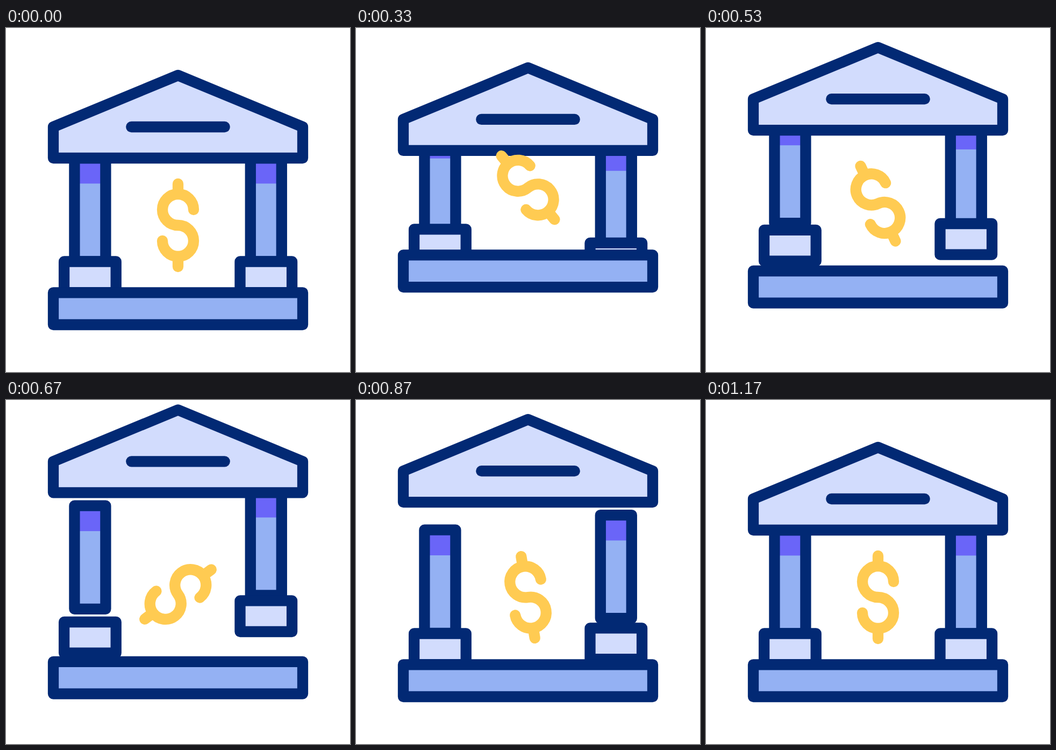
Recreate the animation shown at these times as an HTML page. Size 640 by 640 pixels, loop 1.67 s.

```html
<!DOCTYPE html>
<html lang="en">
<head>
<meta charset="utf-8">
<title>Bank</title>
<style>
  html, body { margin: 0; width: 100%; height: 100%; overflow: hidden; background: #fff; }
  svg { display: block; width: 100%; height: 100%; }
  .line { stroke: #022974; stroke-width: 20.3; stroke-linejoin: round; stroke-linecap: round; }
  .light { fill: #d2dcfd; }
  .mid { fill: #94b1f3; }
  .cap { fill: #6a65f8; }
  .coin { fill: none; stroke: #ffcb52; stroke-width: 20.3; stroke-linecap: round; }
</style>
</head>
<body>
<svg viewBox="0 0 640 640">
  <defs>
    <g id="pillar">
      <rect class="mid" x="127.4" y="242.1" width="58" height="192.2"/>
      <rect class="cap" x="127.4" y="242.1" width="58" height="47.3"/>
      <rect class="line" fill="none" x="127.4" y="242.1" width="58" height="192.2"/>
    </g>
    <rect id="foot" class="light line" x="108.1" y="434.5" width="96.6" height="57.7"/>
  </defs>
  <g id="pillarL"><use href="#pillar"/></g>
  <g id="pillarR"><use href="#pillar" x="327.4"/></g>
  <g id="footL"><use href="#foot"/></g>
  <g id="footR"><use href="#foot" x="327.4"/></g>
  <rect id="base" class="mid line" x="88" y="492.3" width="464" height="59.7"/>
  <g id="roof" class="line">
    <path class="light" d="M88 242V184L320 88L552 184V242Z"/>
    <path d="M233.3 184H406.7"/>
  </g>
  <path id="dollar" class="coin" d="M349 338A29 29 0 1 0 320 367A29 29 0 1 1 291 396M320 290V309M320 425V444"/>
</svg>
<script>
  const LOOP = 1670, STEP = 100 / 3, LAST = 35, LIFT = 71.6;
  const get = id => document.getElementById(id);

  // Each part rises between the first two ticks and falls between the last two.
  const lifts = {
    base: [0, 11, 11.1, 21.8],
    footL: [1.2, 13, 13, 24],
    pillarL: [2.25, 15.1, 15.5, 26.5],
    footR: [3.3, 17, 17.25, 28.7],
    pillarR: [4.3, 19.1, 19.3, 31],
    roof: [5.4, 21.6, 22.2, 33.2]
  };
  const swing = [[0, 0], [13.8, -49], [21, 59], [27, -15], [32, 0]];
  const parts = Object.keys(lifts).map(id => [get(id), lifts[id]]);
  const dollar = get('dollar');

  function ease(a, b, x) {
    const u = Math.min(1, Math.max(0, (x - a) / (b - a)));
    return u * u * (3 - 2 * u);
  }

  const rise = (k, x) => -LIFT * (ease(k[0], k[1], x) - ease(k[2], k[3], x));

  function angle(x) {
    let a = 0;
    for (let i = 1; i < swing.length; i++) {
      const [t0, v0] = swing[i - 1], [t1, v1] = swing[i];
      a += (v1 - v0) * ease(t0, t1, x);
    }
    return a;
  }

  function draw(ms) {
    const tick = Math.min(LAST, Math.floor((ms % LOOP + 3.4) / STEP));
    for (const [el, keys] of parts) {
      el.setAttribute('transform', `translate(0 ${rise(keys, tick).toFixed(2)})`);
    }
    dollar.setAttribute('transform',
      `translate(0 ${rise(lifts.base, tick).toFixed(2)}) rotate(${angle(tick).toFixed(2)} 320 367)`);
  }

  let start;
  function loop(now) {
    if (start === undefined) start = now;
    draw(Math.max(0, now - start));
    requestAnimationFrame(loop);
  }
  draw(0);
  requestAnimationFrame(loop);
</script>
</body>
</html>
```
